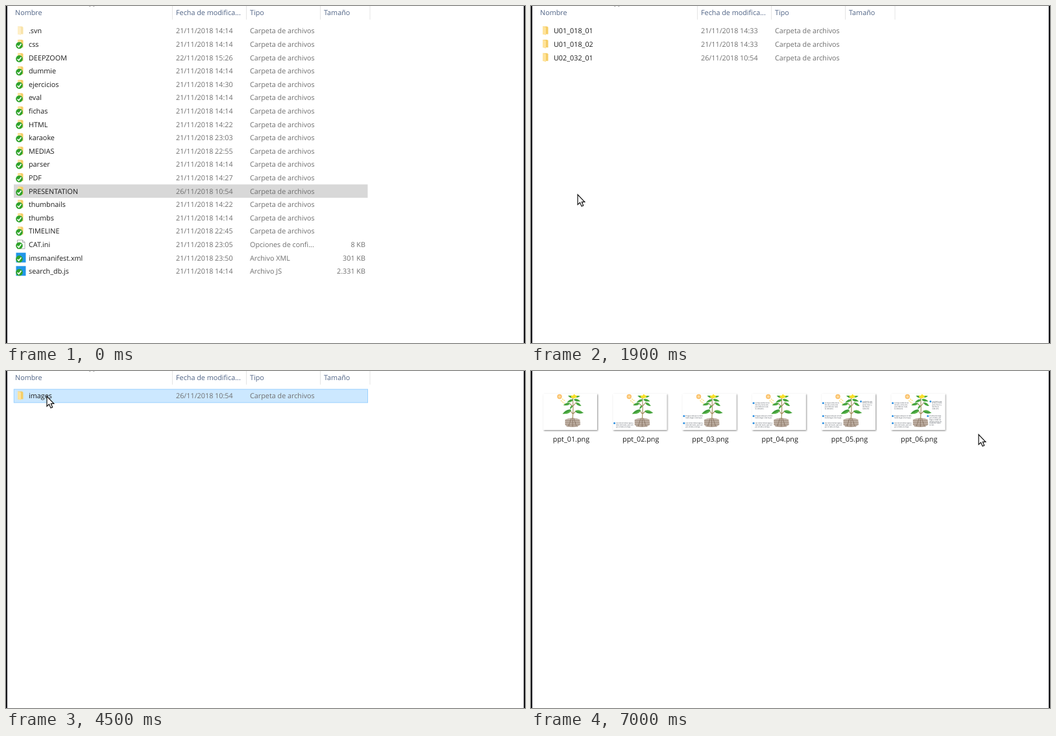
These frames come from a looping animation (800 px wide and 520 px high, 7100 ms). An HTML page:

```html
<!DOCTYPE html>
<html lang="es">
<head>
<meta charset="utf-8">
<title>Explorador de archivos</title>
<style>
  html, body { margin: 0; width: 100%; height: 100%; overflow: hidden; background: #fff; }
  svg { display: block; font: 10.8px "Open Sans", "Noto Sans", sans-serif; text-rendering: geometricPrecision; }
  .name { fill: #1b1b1b; }
  .info { fill: #6f6f6f; }
  .head { fill: #4f6385; }
  .tiny { font-size: 2.35px; font-weight: 600; fill: #4a4f58; }
</style>
</head>
<body>
<svg id="stage" width="800" height="520" viewBox="0 0 800 520">
  <defs>
    <filter id="shadow" x="-10%" y="-10%" width="125%" height="125%">
      <feDropShadow dx="1" dy="1.2" stdDeviation="1.1" flood-color="#000" flood-opacity=".45"/>
    </filter>
    <g id="folder">
      <path d="M18 -7h7l1.5 1.5V5H18z" fill="#f5cd66"/>
      <path d="M18 -7l5 1.5V6.5L18 5z" fill="#ffe39a"/>
    </g>
    <g id="page">
      <path d="M17.500 -7h8l3.500 3.500V6.500H17.500z" fill="#fff" stroke="#999" stroke-width=".8"/>
      <path d="M25.500 -7v3.500h3.500" fill="none" stroke="#999" stroke-width=".8"/>
    </g>
    <rect id="code" x="15.500" y="-8" width="15" height="15" fill="#2196e8"/>
    <g id="check">
      <circle cx="20.500" cy="1.700" r="5.300" fill="#2fa32b"/>
      <path d="M17.600 2l2.100 2.300L23.500 -.8" fill="none" stroke="#fff" stroke-width="1.600"/>
    </g>
    <g id="leaf">
      <path d="M0 0Q4 -5.500 14 0Q5 4.500 0 0z" fill="#58b548"/>
      <path d="M0 0Q5 -1 14 0Q5 4.500 0 0z" fill="#3f9b3c"/>
    </g>
    <g id="plant">
      <path d="M29 8l5 3.500M27 10.500l6 5" stroke="#ffdf70" stroke-width="1.300" stroke-dasharray="2 1"/>
      <circle cx="25" cy="4.500" r="3.700" fill="#fbc069"/>
      <circle cx="25" cy="4.500" r="2" fill="#fddca2"/>
      <path d="M33.500 40q5 -3 11.500 -2.500q7 -.5 11.500 2.500l.5 8q-5 4 -12 3.500q-8 .5 -11.500 -3.500z" fill="#c4b6aa"/>
      <path d="M34 41.500h22M34 44.500h22.500M34 47.500h22.500M36 50h18" stroke="#85705f" stroke-width="1.600" stroke-dasharray=".9 1.100"/>
      <path d="M45 37v14M43 38l-4 12M47 38l4 12" stroke="#7c6655" stroke-width=".7" fill="none"/>
      <path d="M45.300 39Q46.500 24 45.500 7M45 31l-4 -6M46 31l5 -5M45.500 20l-5 -5M46 19l5 -6" stroke="#a08a5a" stroke-width="1.100" fill="none"/>
      <g id="leaves"></g>
      <path d="M43 6l-.5 -3.500l3 .5l2 -2.500l2 2l3 .5l-2 3l-3.500 1.500z" fill="#f8e02c"/>
    </g>
  </defs>
  <rect width="800" height="520" fill="#fff"/>
  <rect id="mark"/>
  <g id="views"></g>
  <path id="cursor" d="M0 0V15.500L3.500 12.300L6 18L8.700 16.900L6.300 11.300H10.800Z" fill="#fff" stroke="#111" stroke-width="1.200"/>
  <path d="M0 0h2v520h-2zM798 0h2v520h-2z" fill="#151519"/>
</svg>
<script>
const LOOP = 7100, STEP = 100, PITCH = 20.6, CELL = 107.25;
const el = id => document.getElementById(id);
const text = (x, y, cls, s, anchor = 'start') =>
  `<text x="${x}" y="${y}" class="${cls}" text-anchor="${anchor}">${s}</text>`;
const use = (id, x, y, extra = '') => `<use href="#${id}" x="${x}" y="${y}" ${extra}/>`;

// x, y, angle, scale
const leaves = [
  [43, 25, 155, 1.05], [49, 27, 12, .95], [41, 15, 165, .75], [50, 14, 30, .7],
  [45, 18, 125, .5], [46, 9, 155, .75], [47, 9, 15, .75], [46, 6, 200, .6], [49, 5, -10, .55]
];
el('leaves').innerHTML = leaves.map(([x, y, a, k]) =>
  use('leaf', 0, 0, `transform="translate(${x} ${y}) rotate(${a}) scale(${k})"`)).join('');

// name | day | time | type | size
const mainFiles = `.svn|21|14:14
css|21|14:14
DEEPZOOM|22|15:26
dummie|21|14:14
ejercicios|21|14:30
eval|21|14:14
fichas|21|14:14
HTML|21|14:22
karaoke|21|23:03
MEDIAS|21|22:55
parser|21|14:14
PDF|21|14:27
PRESENTATION|26|10:54
thumbnails|21|14:22
thumbs|21|14:14
TIMELINE|21|22:45
CAT.ini|21|23:05|Opciones de confi...|8 KB
imsmanifest.xml|21|23:50|Archivo XML|301 KB
search_db.js|21|14:14|Archivo JS|2.331 KB`;
const unitFiles = 'U01_018_01|21|14:33\nU01_018_02|21|14:33\nU02_032_01|26|10:54';
const imageFiles = 'images|26|10:54';

const header = [[14, 'Nombre'], [262, 'Fecha de modifica...'], [376, 'Tipo'], [490, 'Tamaño']]
  .map(([x, s]) => text(x, 13.7, 'head', s)).join('') +
  '<path d="M256.500 0v21M370.500 0v21M484.500 0v21M561 0v21" stroke="#e4e4e4"/>' +
  '<path d="M128 .4h2.500M134 .4h2.500" stroke="#999" stroke-width=".8"/>';

function row(line, i) {
  const [name, day, time, type = 'Carpeta de archivos', size = ''] = line.split('|');
  const mid = 38.5 + PITCH * i, base = mid + 3.8;
  const icon = !size ? 'folder' : name.endsWith('.ini') ? 'page' : 'code';
  return use(icon, 0, mid, name === '.svn' ? 'opacity=".55"' : '') +
    text(35, base, 'name', name) +
    text(262, base, 'info', `${day}/11/2018 ${time}`) +
    text(376, base, 'info', type) +
    text(554, base, 'info', size, 'end');
}
const checks = (from, to) => {
  let s = '';
  for (let i = from; i <= to; i++) s += use('check', 0, 38.5 + PITCH * i);
  return s;
};
const list = files => header + files.split('\n').map(row).join('');

// Captions: first slide showing them, bullet x, top y, lines
const captions = [
  [2, 2.3, 45.5, ['Las raíces toman agua y', 'sales del suelo, que van', 'por el tallo a la hoja.']],
  [3, 2.3, 34.5, ['El agua sube por el tallo', 'hasta llegar a las hojas.']],
  [4, 2.3, 14.5, ['La hoja recibe la luz', 'del sol y toma aire', 'para fabricar todo', 'su alimento.']],
  [5, 60.5, 12, ['La planta usa', 'la luz y el aire', 'para crecer y', 'dar flores', 'cada año.']],
  [6, 56.5, 34.5, ['El alimento baja', 'por el tallo y así', 'llega a todas las', 'demás partes de', 'la planta, hasta', 'la raíz.']]
];
function slide(n) {
  const left = 19 + CELL * (n - 1);
  const notes = captions.filter(c => c[0] <= n).map(([, x, y, lines]) =>
    `<circle cx="${x}" cy="${y}" r="1.500" fill="#2d8fe0"/>` +
    lines.map((s, i) => text(x + 2.4, y + .6 + i * 2.8, 'tiny', s)).join('')).join('');
  return `<g transform="translate(${left} 35)">
    <rect width="83" height="56" fill="#fff" filter="url(#shadow)"/>${use('plant', 0, 0)}${notes}</g>` +
    text(left + 43, 109, 'name', `ppt_0${n}.png`, 'middle');
}

// Each view lasts from its start to the next one
const views = [
  { start: 0, rows: 19, body: list(mainFiles) + checks(1, 18), picked: 12, active: 1000 },
  { start: 1500, rows: 3, body: list(unitFiles), late: checks(0, 1), lateAt: 2100, picked: 2, active: 2800 },
  { start: 3000, rows: 1, body: list(imageFiles), picked: 0, active: 4400 },
  { start: 4700, body: [1, 2, 3, 4, 5, 6].map(slide).join('') }
];
const idle = '<rect x="12" y="275.300" width="545.500" height="20.600" fill="#d8d8d8"/><rect id="over"/>';
el('views').innerHTML = views.map((v, i) =>
  `<g id="view${i}">${i ? '' : idle}${v.body}<g id="late${i}">${v.late || ''}</g></g>`).join('');

// time, x, y of the pointer tip
const path = [
  [0, 760, 540], [100, 673, 510], [200, 545, 490], [300, 383, 441], [400, 185, 368],
  [500, 108, 325], [600, 75, 300], [700, 72, 296.5], [800, 72, 293], [900, 72, 291],
  [1900, 72, 291], [2000, 66, 250], [2100, 65, 175], [2200, 65, 123], [2300, 65, 109],
  [2400, 65, 97], [2500, 65, 88], [2600, 65, 84], [3600, 65, 84], [3700, 65, 72],
  [3800, 64, 58], [3900, 64, 58], [4000, 63, 46], [4200, 63, 39], [4900, 63, 39],
  [5100, 50, 80], [5300, 41, 101], [5500, 41, 101], [5600, 72, 104], [5700, 180, 107],
  [5800, 330, 106], [5900, 480, 104], [6000, 600, 101], [6100, 670, 99], [6200, 690, 98], [LOOP, 690, 98]
];
function pointer(t) {
  const i = path.findIndex(p => p[0] > t);
  const [t0, x0, y0] = path[i - 1], [t1, x1, y1] = path[i];
  const k = (t - t0) / (t1 - t0);
  return [x0 + (x1 - x0) * k, y0 + (y1 - y0) * k];
}

function box(node, x, y, w, h, fill, stroke = 'none') {
  const a = { x, y, width: w, height: h, fill, stroke };
  for (const k in a) node.setAttribute(k, a[k]);
}
const show = (node, on) => node.setAttribute('display', on ? 'inline' : 'none');

function highlight(node, view, t, x, y) {
  if (view.rows) {
    const selected = t >= view.active;
    const i = selected ? view.picked : Math.floor((y - 28.2) / PITCH);
    const inside = x >= 12 && x <= 558 && i >= 0 && i < view.rows;
    show(node, selected || inside);
    box(node, 12.3, 28.2 + PITCH * i, 545.2, PITCH, selected ? '#cce8ff' : '#e5f3ff', selected ? '#99d1ff' : 'none');
  } else {
    const i = Math.floor((x - 12) / CELL);
    show(node, i >= 0 && i < 6 && x - 12 - i * CELL < 100 && y < 115);
    box(node, 12 + CELL * i, 3, 100, 112, '#e5f3ff');
  }
}

function draw(now) {
  const t = Math.floor(now % LOOP / STEP) * STEP;
  const [x, y] = pointer(t);
  const current = views.findLastIndex(v => v.start <= t);
  views.forEach((v, i) => {
    show(el('view' + i), i === current);
    show(el('late' + i), t >= (v.lateAt || 0));
  });
  show(el('mark'), false);
  highlight(current ? el('mark') : el('over'), views[current], t, x, y);
  el('cursor').setAttribute('transform', `translate(${x} ${y})`);
}

let begin;
function tick(now) {
  begin ??= now;
  draw(now - begin);
  requestAnimationFrame(tick);
}
draw(0);
requestAnimationFrame(tick);
</script>
</body>
</html>
```
